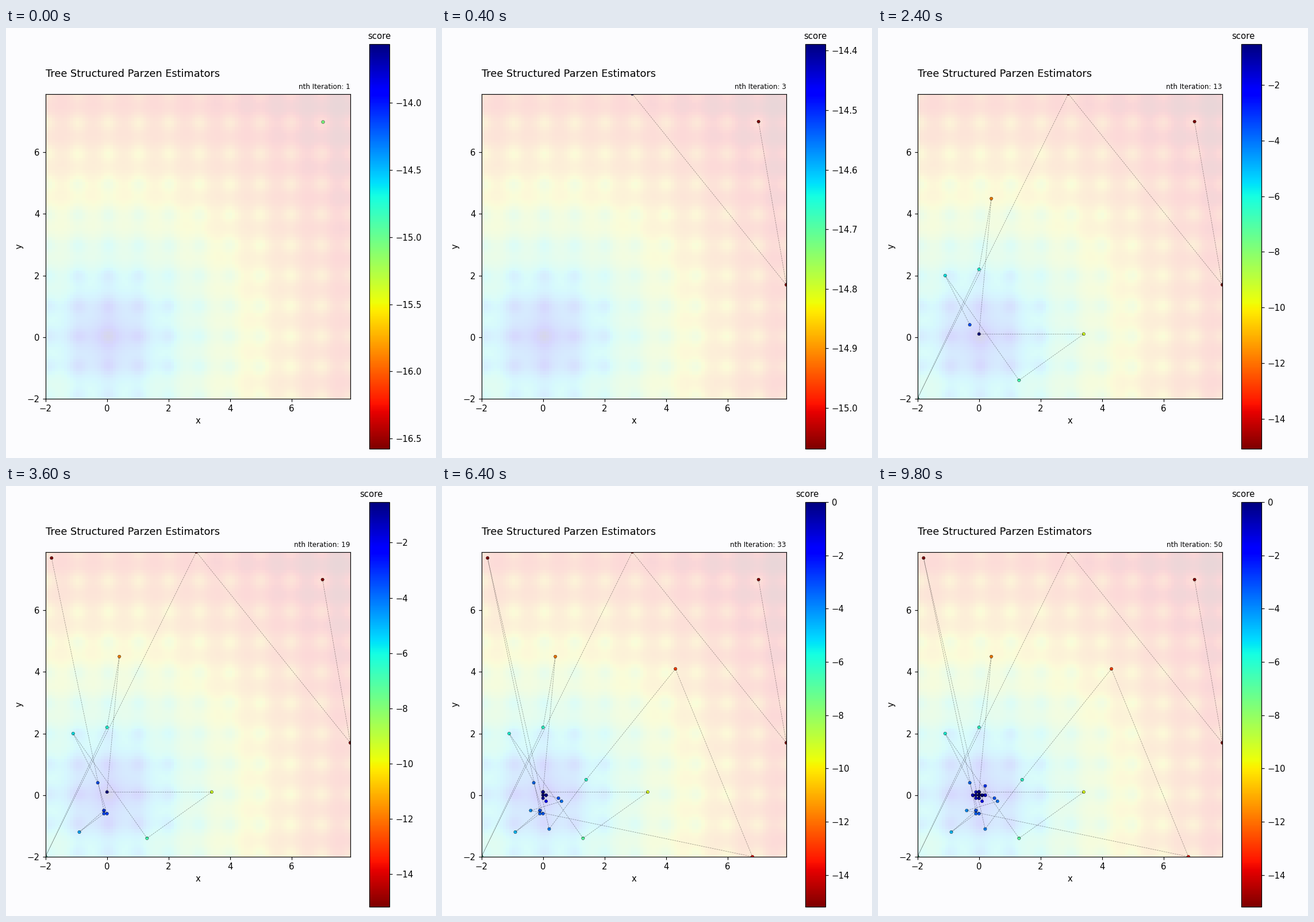
Write a matplotlib script that moves like this. It is 748 px wide and 748 px high and loops after 10 s.

```python
import numpy as np
import matplotlib.pyplot as plt
from matplotlib.animation import FuncAnimation

LOW, HIGH = -2, 7.9
PAPER = "#fcfcfe"
GOLDEN = np.pi * (3 - np.sqrt(5))


def score(x, y):
    """Negative Ackley function."""
    bowl = 20 * np.exp(-0.2 * np.sqrt((x**2 + y**2) / 2))
    waves = np.exp((np.cos(2 * np.pi * x) + np.cos(2 * np.pi * y)) / 2)
    return bowl + waves - 20 - np.e


def hover(count, cx, cy, rx, ry):
    """Local search around a centre, snapped to the 0.1 grid."""
    angle = GOLDEN * np.arange(count)
    spots = np.column_stack([cx + rx * np.cos(angle), cy + ry * np.sin(angle)])
    return np.round(spots, 1)


# Wide exploration jumps alternate with ever closer local searches
path = np.vstack([
    [(7, 7), (7.9, 1.7), (2.9, 7.9)],
    [(LOW, LOW)] * 3,
    [(0, 2.2), (0.4, 4.5), (0, 0.1), (3.4, 0.1)],
    [(1.3, -1.4), (-1.1, 2), (-0.3, 0.4)],
    hover(3, -0.056, -0.56, 0.04, 0.04),
    [(-0.9, -1.2), (-0.1, -0.5), (-1.8, 7.7), (0.2, -1.1)],
    [(1.4, 0.5), (4.3, 4.1), (6.8, LOW)],
    [(-0.4, -0.5), (0.6, -0.2), (0.5, -0.1)],
    hover(6, 0.025, 0, 0.03, 0.09),
    [(0.1, -0.2), (0.2, 0.3)],
    hover(16, -0.04, 0, 0.2, 0.055),
])
scores = score(*path.T)

grid = np.linspace(LOW, HIGH, 100)
surface = score(*np.meshgrid(grid, grid))

plt.rcParams.update({
    "font.family": "DejaVu Sans",
    "image.cmap": "jet_r",
    "axes.facecolor": PAPER,
    "figure.facecolor": PAPER,
})
fig = plt.figure(figsize=(7, 7), dpi=748 / 7)


def draw(frame):
    n = frame + 1
    x, y = path[:n].T
    seen = scores[:n]

    fig.clear()
    fig.subplots_adjust(left=0.125, right=0.9, bottom=0.11, top=0.88)
    ax = fig.add_subplot()
    ax.imshow(surface, alpha=0.15, origin="lower",
              extent=(LOW, HIGH, LOW, HIGH))
    ax.plot(x, y, "--", color="black", alpha=0.4, linewidth=0.5)
    dots = ax.scatter(x, y, c=seen, s=15, marker="H",
                      vmin=seen.min(), vmax=seen.max(),
                      edgecolors="black", linewidth=0.3)
    ax.set(xlim=(LOW, HIGH), ylim=(LOW, HIGH), xlabel="x", ylabel="y")
    ax.set_title("Tree Structured Parzen Estimators\n", loc="left")
    ax.set_title(f"nth Iteration: {n}", loc="right", fontsize=8)

    bar = fig.colorbar(dots, ax=ax)
    bar.set_label("score", labelpad=-50, y=1.03, rotation=0)
    fig.tight_layout(rect=(-0.001, 0.0005, 0.9993, 0.998))
    return []


anim = FuncAnimation(fig, draw, frames=len(path), interval=200, repeat=True)
plt.show()
```
